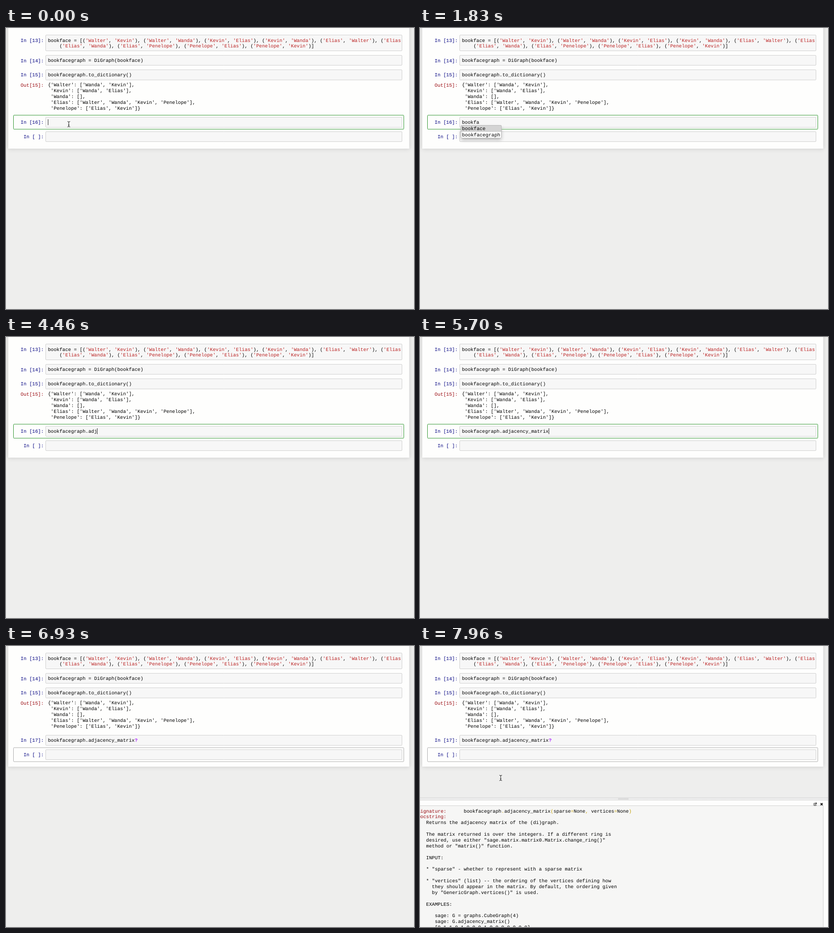
An HTML page with a canvas that plays this animation: 900x622 px, repeating every 8000 ms.

```html
<!DOCTYPE html>
<html lang="en">
<head>
<meta charset="utf-8">
<title>Notebook session</title>
<style>
html, body { margin: 0; width: 100%; height: 100%; overflow: hidden; background: #eeeeed; }
canvas { display: block; }
</style>
</head>
<body>
<canvas id="stage" width="900" height="622"></canvas>
<script>
const ctx = document.getElementById('stage').getContext('2d');
const LOOP = 8000;
const SIZE = 10.637, MENU_SIZE = 10.83, PITCH = SIZE * 0.6001, LINE = 12.88;
const CODE_X = 92.4, CODE_Y = 211.6, DOC_X = -5.6;
const NAVY = '#000080', DARK_RED = '#9a0a10', STRING = '#ba2121', GOLD = '#c4a000';

const EDGES = [
  "bookface = [('Walter', 'Kevin'), ('Walter', 'Wanda'), ('Kevin', 'Elias'), ('Kevin', 'Wanda'), ('Elias', 'Walter'), ('Elias",
  "    ('Elias', 'Wanda'), ('Elias', 'Penelope'), ('Penelope', 'Elias'), ('Penelope', 'Kevin')]"
];
const OUTPUT = [
  "{'Walter': ['Wanda', 'Kevin'],",
  " 'Kevin': ['Wanda', 'Elias'],",
  " 'Wanda': [],",
  " 'Elias': ['Walter', 'Wanda', 'Kevin', 'Penelope'],",
  " 'Penelope': ['Elias', 'Kevin']}"
];
const DOC = `
   Returns the adjacency matrix of the (di)graph.

   The matrix returned is over the integers. If a different ring is
   desired, use either "sage.matrix.matrix0.Matrix.change_ring()"
   method or "matrix()" function.

   INPUT:

   * "sparse" - whether to represent with a sparse matrix

   * "vertices" (list) -- the ordering of the vertices defining how
     they should appear in the matrix. By default, the ordering given
     by "GenericGraph.vertices()" is used.

   EXAMPLES:

      sage: G = graphs.CubeGraph(4)
      sage: G.adjacency_matrix()
      [0 1 1 0 1 0 0 0 1 0 0 0 0 0 0 0]`.split('\n');

const CALL = 'bookfacegraph.adjacency_matrix?';
// [time, typed characters]
const TYPING = [[0, 0], [630, 1], [700, 2], [930, 3], [1030, 4], [1130, 5], [1300, 6],
  [2530, 13], [3300, 14], [4230, 15], [4360, 16], [4460, 17], [4660, 30], [5730, 31]];
// [from, to] while the caret is hidden
const BLINKS = [[300, 630], [1830, 2360], [3030, 3300], [3860, 4230], [5160, 5700], [6230, 6760]];
const RUN = 6860, DONE = 6930, PAGER = 7130;

const within = (t, from, to) => t >= from && t < to;

function rect(x, y, w, h, color) {
  ctx.fillStyle = color;
  ctx.fillRect(x, y, w, h);
}

function frame(x, y, w, h, stroke, fill) {
  ctx.beginPath();
  ctx.roundRect(x, y, w, h, 1.5);
  if (fill) { ctx.fillStyle = fill; ctx.fill(); }
  ctx.strokeStyle = stroke;
  ctx.lineWidth = 1;
  ctx.stroke();
}

function path(points, color, width) {
  ctx.beginPath();
  points.forEach(([x, y], i) => i ? ctx.lineTo(x, y) : ctx.moveTo(x, y));
  ctx.strokeStyle = color;
  ctx.lineWidth = width;
  ctx.stroke();
}

function text(str, x, y, color = '#000', weight = '', size = SIZE) {
  ctx.font = `${weight} ${size}px "Liberation Mono", "Courier New", monospace`;
  ctx.fillStyle = color;
  ctx.fillText(str, x, y);
}

// Pieces captured by the pattern get the accent colour.
function marked(str, x, y, pattern, accent, weight) {
  let col = 0;
  str.split(pattern).forEach((part, i) => {
    text(part, x + col * PITCH, y, i % 2 ? accent : '#000', i % 2 ? weight : '');
    col += part.length;
  });
}

function prompt(label, y, color = NAVY) {
  text(label, 83.4 - label.length * PITCH, y, color);
}

const input = (y, h) => frame(87.5, y, 786, h, '#cfcfcf', '#f7f7f7');

function shadowed(x, y, w, h, color, blur, dy, shade) {
  ctx.save();
  ctx.shadowColor = shade;
  ctx.shadowBlur = blur;
  ctx.shadowOffsetY = dy;
  rect(x, y, w, h, color);
  ctx.restore();
}

function drawNotebook(t) {
  rect(0, 0, 900, 622, '#eeeeed');
  shadowed(5, -20, 884.5, 287, '#fefefd', 9, 0.5, 'rgba(87,87,87,.23)');

  if (t < RUN) frame(16.5, 193, 861, 31, '#2a922a');
  else frame(16.5, 225, 861, 31, '#ababab');

  input(15.5, 35);
  input(60.5, 22);
  input(92.5, 22.5);
  input(197.5, 22.5);
  input(229.5, 22);

  prompt('In [13]:', 31);
  EDGES.forEach((s, i) => marked(s, CODE_X, 30.6 + i * LINE, /('[^']*'?)/, STRING));
  prompt('In [14]:', 75.5);
  text('bookfacegraph = DiGraph(bookface)', CODE_X, 75.2);
  prompt('In [15]:', 107.3);
  text('bookfacegraph.to_dictionary()', CODE_X, 107);
  prompt('Out[15]:', 129.9, DARK_RED);
  OUTPUT.forEach((s, i) => text(s, CODE_X, 129.2 + i * LINE));
  prompt(t < RUN ? 'In [16]:' : t < DONE ? 'In [*]:' : 'In [17]:', 212.4);
  prompt('In [ ]:', 244.2);
}

function drawTyping(t) {
  const count = TYPING.filter(([start]) => start <= t).pop()[1];
  marked(CALL.slice(0, count), CODE_X, CODE_Y, /(\?)/, '#aa22ff', 'bold');
  const hidden = BLINKS.some(([from, to]) => within(t, from, to));
  if (t < RUN && !hidden) rect(CODE_X + count * PITCH, 202, 1, 13, '#222');
}

function drawCompletion(t) {
  if (!within(t, 1600, 2530)) return;
  shadowed(91, 217, 88, 26, '#fff', 7.6, 4, '#adadad');
  rect(90, 216, 90, 28, '#fff');
  rect(90, t < 2160 ? 216 : 230, 90, 14, '#d4d4d4');
  frame(90.5, 215.5, 89, 28, '#b8b8b8');
  text('bookface', CODE_X, 226.2, '#000', '', MENU_SIZE);
  text('bookfacegraph', CODE_X, 239.9, '#000', '', MENU_SIZE);
}

function drawPager(t) {
  if (t < PAGER) return;
  const edge = ctx.createLinearGradient(0, 335, 0, 342);
  edge.addColorStop(0, '#d9d9d9');
  edge.addColorStop(0.35, '#ececec');
  edge.addColorStop(1, '#eeeeee');
  rect(0, 335, 900, 7, edge);
  rect(437, 337, 23, 1, '#cfcfcf');
  rect(437, 339, 23, 1, '#cfcfcf');
  rect(0, 341, 900, 1, '#dddddd');
  rect(0, 342, 900, 280, '#fefefd');
  rect(0, 353, 889, 269, '#f6f6f5');
  rect(0, 353, 889, 1, '#d0d0d0');
  rect(889, 353, 1, 269, '#d0d0d0');

  // open-in-window and close icons
  path([[871.5, 348], [869, 348], [869, 353], [873.8, 353], [873.8, 351]], '#222', 1);
  path([[871, 351], [874.5, 347.5]], '#222', 1.2);
  path([[872, 347.2], [874.8, 347.2], [874.8, 350]], '#222', 1);
  path([[883.6, 347.8], [888.2, 352.4]], '#111', 1.9);
  path([[888.2, 347.8], [883.6, 352.4]], '#111', 1.9);

  const row = i => 368.6 + i * LINE;
  text('Signature:', DOC_X, row(0), DARK_RED);
  marked('bookfacegraph.adjacency_matrix(sparse=None, vertices=None)',
    DOC_X + 16 * PITCH, row(0), /([.(=,)])/, GOLD);
  text('Docstring:', DOC_X, row(1), DARK_RED);
  DOC.forEach((s, i) => text(s, DOC_X, row(i + 1)));
}

function drawPointer(t) {
  if (within(t, 630, 7930)) return;
  const [x, y] = t < 630 ? [138.5, 213] : t < 7960 ? [139, 217.5] : [178, 292];
  const beam = [[[-3, -6], [-1, -5.6], [0, -4.6], [1, -5.6], [3, -6]],
    [[0, -4.6], [0, 4.6]],
    [[-3, 6], [-1, 5.6], [0, 4.6], [1, 5.6], [3, 6]],
    [[-1.5, 2], [1.5, 2]]];
  const stroke = (color, width) => beam.forEach(line =>
    path(line.map(([dx, dy]) => [x + dx, y + dy]), color, width));
  stroke('rgba(255,255,255,.7)', 2.4);
  stroke('#222', 1.1);
}

function draw(now) {
  const t = now % LOOP;
  drawNotebook(t);
  drawTyping(t);
  drawCompletion(t);
  drawPager(t);
  drawPointer(t);
}

ctx.textRendering = 'geometricPrecision';
const start = performance.now();
function tick() {
  draw(performance.now() - start);
  requestAnimationFrame(tick);
}
tick();
</script>
</body>
</html>
```
